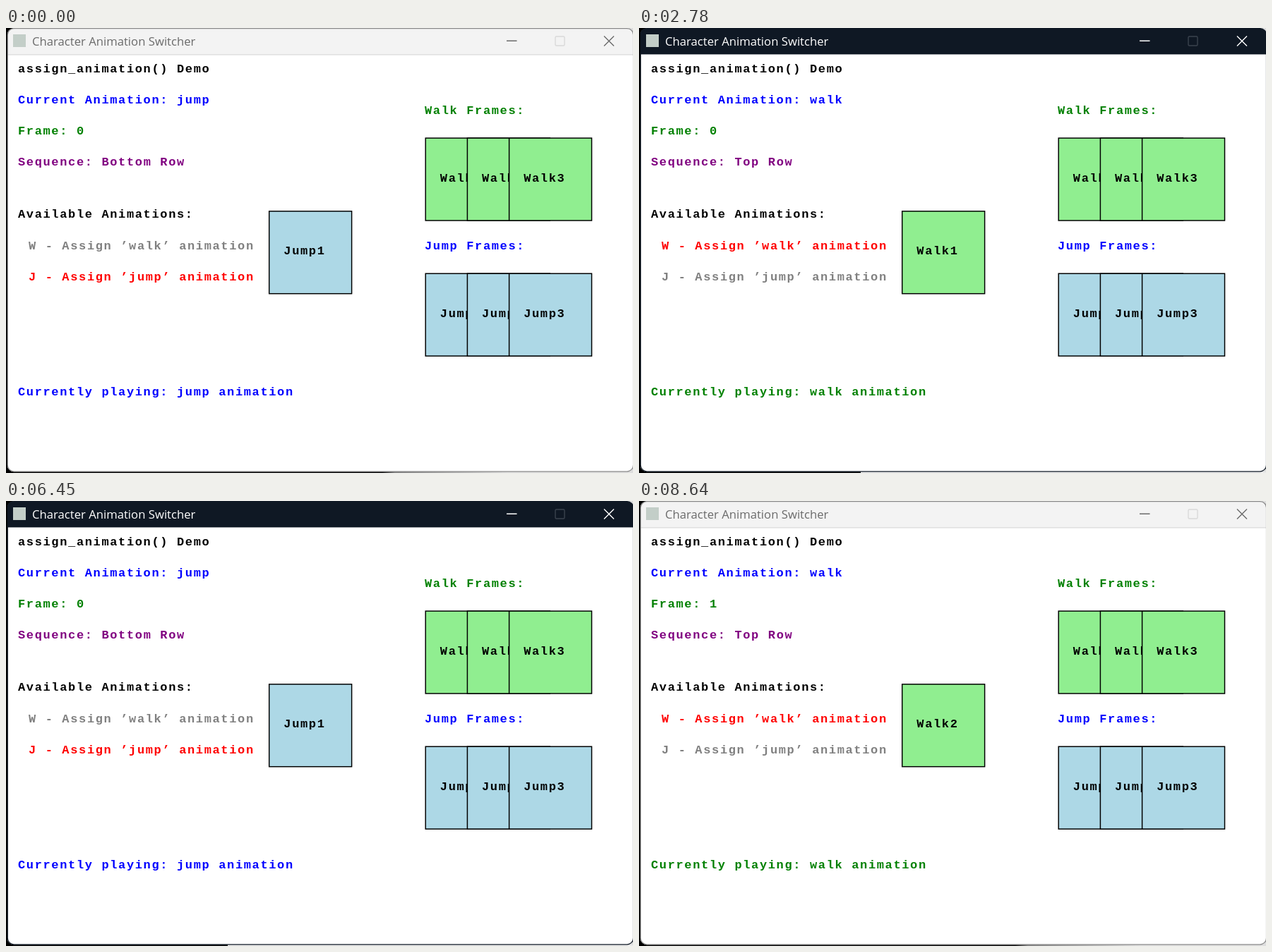
Animation, 888 px wide and 631 px high, one loop 8710 ms. Source, as an HTML page:

```html
<!DOCTYPE html>
<html lang="en">
<head>
<meta charset="utf-8">
<title>Character Animation Switcher</title>
<style>
  html, body { margin: 0; width: 100%; height: 100%; overflow: hidden; background: #000; }
  svg { display: block; width: 100%; height: 100%; }
  .mono { font: bold 17px "Liberation Mono", monospace; letter-spacing: 1.64px; }
  .title { font: 16.7px "Open Sans", sans-serif; fill: var(--ink); }
  .controls { fill: none; stroke: var(--ink); stroke-width: 1.4; }
  .sheet rect { stroke: #000; stroke-width: 1.48; }
  #app { --bar: #f3f3f3; --ink: #6b6b6b; --dim: #d9d9d9; --edge: #8a8a8a; --rule: #d0d0d0; --floor: none; }
  #app.active { --bar: #0f1824; --ink: #fff; --dim: #3b434e; --edge: #0f1824; --rule: none; --floor: #e8e8e8; }
</style>
</head>
<body>
<svg id="app" viewBox="0 0 888 631">
  <defs>
    <linearGradient id="desk">
      <stop offset=".6" stop-color="#000"/>
      <stop offset=".62" stop-color="#777"/>
      <stop offset=".8" stop-color="#ddd"/>
    </linearGradient>
    <clipPath id="frame"><rect x="2" y="0.6" width="886.5" height="628.6" rx="9"/></clipPath>
  </defs>
  <rect width="888" height="631" fill="url(#desk)"/>
  <rect x="314" y="629" width="574" height="2" fill="var(--floor)"/>
  <g clip-path="url(#frame)">
    <rect width="889" height="631" fill="#fff"/>
    <rect width="889" height="37.4" fill="var(--bar)"/>
    <path d="M0 37.9H889" stroke="var(--rule)"/>
  </g>
  <rect x="2.3" y="0.6" width="886.2" height="628.2" rx="9" fill="none" stroke="var(--edge)" stroke-width="1.2"/>

  <rect x="10" y="9" width="18" height="18" fill="#c3cec8"/>
  <text class="title" x="37" y="24.5">Character Animation Switcher</text>
  <g class="controls">
    <path d="M709 18.3H723.5M847 11.5L861 25.5M861 11.5L847 25.5"/>
    <rect x="778" y="12" width="13" height="13" rx="1.5" stroke="var(--dim)"/>
  </g>

  <g class="mono">
    <text x="17" y="62.5">assign_animation() Demo</text>
    <text x="17" y="106.7" fill="blue">Current Animation: <tspan class="mode"></tspan></text>
    <text x="17" y="151" fill="green">Frame: <tspan id="index"></tspan></text>
    <text x="17" y="195.2" fill="purple">Sequence: <tspan id="row"></tspan></text>
    <text x="17" y="269.2">Available Animations:</text>
    <text x="32" y="313.6" id="walkKey">W - Assign ’walk’ animation</text>
    <text x="32" y="358" id="jumpKey">J - Assign ’jump’ animation</text>
    <text x="17" y="520.6" id="status">Currently playing: <tspan class="mode"></tspan> animation</text>
    <text x="593" y="121.6" fill="green">Walk Frames:</text>
    <text x="593" y="313.6" fill="blue">Jump Frames:</text>
    <g class="sheet" id="sheet"></g>
  </g>

  <g id="pointer">
    <circle cx="2" cy="2" r="17.5" fill="#f0f02a" fill-opacity=".68"/>
    <path d="M1 1.5Q-.5 14 1 26.5Q2 29 4 27.5Q8 21 19 18.5Q22 17.5 20 15.5Q12 7 1 1.5Z" fill="#fff" stroke="#000" stroke-width="2.2" stroke-linejoin="round"/>
  </g>
</svg>
<script>
const LOOP = 8710;
const ACTIVE_FROM = 390, ACTIVE_TO = 8640;
const CARD = 116.9, CARD_STEP = 59.2;
const modes = {
  walk: { label: 'Walk', row: 'Top Row', ink: 'green', fill: '#90ee90' },
  jump: { label: 'Jump', row: 'Bottom Row', ink: 'blue', fill: '#add8e6' }
};

// Each run: mode, then the start times of its cycling poses 0, 1, 2, 0, ...
const runs = [
  ['jump', 0, 390, 990],
  ['walk', 1450, 1580, 2180, 2780, 3380, 3980, 4650],
  ['jump', 5120, 5250, 5850, 6450, 7050, 7650],
  ['walk', 7780, 8250]
];
const poses = runs.flatMap(([mode, ...times]) =>
  times.map((start, i) => ({ start, mode, index: i % 3 })));

const pointerStops = [
  [0, null], [260, [785, 529]], [330, [709, 453]], [530, [760, 506]],
  [590, [872, 600]], [660, null]
];

const $ = id => document.getElementById(id);
const add = (parent, tag, attrs, text = '') => {
  const node = document.createElementNS('http://www.w3.org/2000/svg', tag);
  for (const key in attrs) node.setAttribute(key, attrs[key]);
  node.textContent = text;
  return parent.appendChild(node);
};
const addCard = (x, y, fill, label) => [
  add($('sheet'), 'rect', { x, y, width: CARD, height: CARD, fill }),
  add($('sheet'), 'text', { x: x + 20.6, y: y + 61.5 }, label)
];

for (const [mode, y] of [['walk', 156.1], ['jump', 348.2]]) {
  for (let i = 0; i < 3; i++) {
    addCard(594.2 + i * CARD_STEP, y, modes[mode].fill, modes[mode].label + (i + 1));
  }
}
const [sprite, spriteLabel] = addCard(372.7, 259.8, '#fff', '');

function showPose({ mode, index }) {
  const { label, row, ink, fill } = modes[mode];
  document.querySelectorAll('.mode').forEach(node => node.textContent = mode);
  $('index').textContent = index;
  $('row').textContent = row;
  $('status').setAttribute('fill', ink);
  for (const key in modes) $(key + 'Key').setAttribute('fill', key === mode ? 'red' : 'gray');
  sprite.setAttribute('fill', fill);
  spriteLabel.textContent = label + (index + 1);
}

let shown;
function render(now) {
  const t = now % LOOP;
  const pose = poses.findLast(p => p.start <= t);
  if (pose !== shown) showPose(shown = pose);
  $('app').classList.toggle('active', t >= ACTIVE_FROM && t < ACTIVE_TO);
  const spot = pointerStops.findLast(([start]) => start <= t)[1];
  $('pointer').setAttribute('visibility', spot ? 'visible' : 'hidden');
  if (spot) $('pointer').setAttribute('transform', `translate(${spot})`);
}

const began = performance.now();
function tick() {
  render(performance.now() - began);
  requestAnimationFrame(tick);
}
tick();
</script>
</body>
</html>
```
